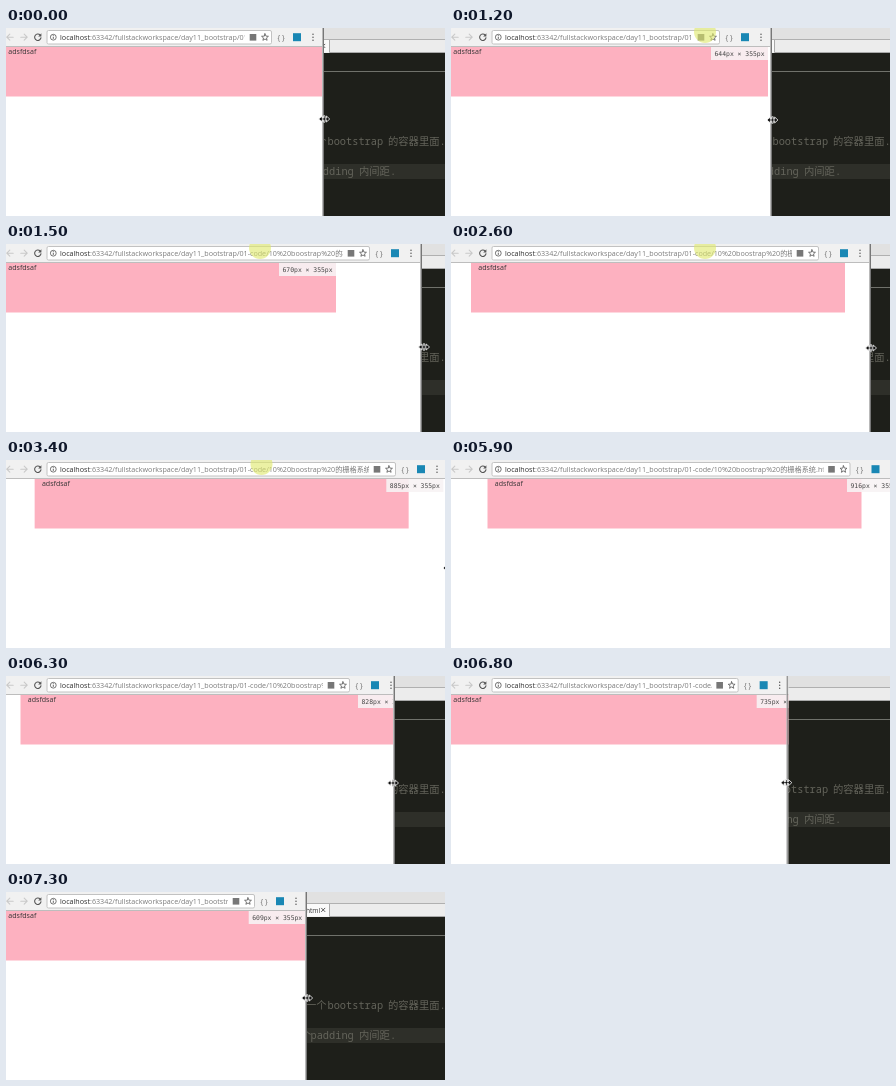
Write an HTML page that moves like this. It is 439x188 px and loops after 8 s.

```html
<!DOCTYPE html>
<html lang="zh">
<head>
<meta charset="utf-8">
<title>Responsive container</title>
<style>
html, body { margin: 0; width: 100%; height: 100%; overflow: hidden; background: #fff; }
svg { overflow: hidden; }
#stage { display: block; width: 439px; height: 188px; }
text { white-space: pre; }
.ui { font-family: "Open Sans", "Noto Sans CJK SC", "Noto Sans CJK", sans-serif; }
.code { font: 10.3px "Noto Sans Mono", "Noto Sans CJK SC", "Noto Sans CJK", monospace; fill: #64645b; }
.size { font: 6.4px "DejaVu Sans Mono", monospace; fill: #454545; }
.line { fill: none; stroke-linecap: round; stroke-linejoin: round; }
</style>
</head>
<body>
<svg id="stage" viewBox="0 0 439 188">
  <g id="editor">
    <rect x="290" width="149" height="188" fill="#1e1f1a"/>
    <rect x="290" width="149" height="25" fill="#ececec"/>
    <rect x="290" width="149" height="11" fill="#e1e1e1"/>
    <path d="M290 11.5H439" stroke="#b0b0b0"/>
    <path d="M290 12H323V24.5H290" fill="#fafafa"/>
    <path d="M323.5 12V24.5H439" fill="none" stroke="#a9a9a9"/>
    <text class="ui" x="300" y="20.5" font-size="6.6" fill="#333">html</text>
    <path class="line" d="M315.5 16.2l3.4 3.4m0-3.4l-3.4 3.4" stroke="#444" stroke-width=".9"/>
    <path d="M290 43.5H439" stroke="#70716b"/>
    <rect x="290" y="136" width="149" height="15" fill="#2e2f29"/>
    <g class="code">
      <text x="300" y="117">一个</text>
      <text x="321.5" y="117">bootstrap</text>
      <text x="382" y="117">的容器里面.</text>
      <text x="295" y="147">个</text>
      <text x="304.5" y="147">padding</text>
      <text x="353" y="147">内间距.</text>
    </g>
  </g>

  <svg id="win" height="188">
    <rect width="480" height="188" fill="#fff"/>
    <rect id="pink" y="18.5" height="50" fill="#fdb1c0"/>
    <text id="word" class="ui" y="26.2" font-size="7.05" fill="#333">adsfdsaf</text>
    <g id="label">
      <rect y="18.5" width="57" height="13.5" fill="#f8f3f4" fill-opacity=".9"/>
      <text id="size" class="size" x="3.5" y="27.8"></text>
    </g>

    <rect width="480" height="18" fill="#f1f1f1"/>
    <path d="M0 18.5H480" stroke="#bdbdbd"/>
    <g class="line" stroke="#c9c9c9" stroke-width="1.1">
      <path d="M7.2 9.2H.8M3.8 6.2l-3 3l3 3"/>
      <path d="M14.8 9.2h6.4M18.2 6.2l3 3l-3 3"/>
      <path d="M34.2 7.1a3.2 3.2 0 1 0 .8 2.6" stroke="#555"/>
    </g>
    <path d="M35.4 5.3v3.2h-3.2z" fill="#555"/>
    <rect id="bar" x="41" y="2.5" height="13.5" rx="1.5" fill="#fff" stroke="#c2c2c2"/>
    <circle cx="47.3" cy="9.2" r="2.9" fill="none" stroke="#555" stroke-width=".8"/>
    <path d="M47.3 8.7v2.2M47.3 7.1v.8" stroke="#555" stroke-width=".9"/>
    <svg id="url" height="18">
      <text class="ui" x="54" y="11.8" font-size="7.17" fill="#7b7b7b"><tspan fill="#2d2d2d">localhost</tspan>:63342/fullstackworkspace/day11_bootstrap/01-code/10%20boostrap%20的栅格系统.html</text>
    </svg>
    <g id="tools">
      <rect x="-74.3" y="6" width="6.6" height="6.6" fill="#777"/>
      <path id="star" class="line" stroke="#555" stroke-width=".8"/>
      <text class="ui" x="-43" y="11.6" font-size="7" fill="#666" text-anchor="middle">{ }</text>
      <rect x="-31" y="5.2" width="8" height="8" fill="#1987b4"/>
      <path d="M-11 6.2v.01M-11 9.2v.01M-11 12.2v.01" class="line" stroke="#555" stroke-width="1.5"/>
    </g>
    <circle id="spot" r="11" fill="#dfe96c" fill-opacity=".62"/>
    <g id="edge">
      <path d="M-1.5 0V188" stroke="#b9b9b9"/>
      <path d="M-.5 0V188" stroke="#777"/>
    </g>
  </svg>

  <path id="cursor" d="M-5.5 0l3.3-3v2.2h1.4v-2.4h1.6v2.4h1.4v-2.2l3.3 3l-3.3 3v-2.2h-1.4v2.4h-1.6v-2.4h-1.4v2.2z"
        fill="#111" stroke="#fff" stroke-width=".8"/>
</svg>
<script>
const LOOP = 8000, STEP = 100, SCALE = 0.4987;
const $ = id => document.getElementById(id);
const set = (id, attrs) => {
  for (const k in attrs) $(id).setAttribute(k, attrs[k]);
};
const move = (id, x, y = 0) => set(id, { transform: `translate(${x} ${y})` });
const show = (id, on) => set(id, { visibility: on ? "visible" : "hidden" });

// time, window edge, toolbar edge, page edge, pointer y
const drag = [
  [0, 318, 318, 316, 91],
  [1100, 318, 318, 316, 91],
  [1200, 321, 321, 317, 92],
  [1300, 333, 333, 319, 95],
  [1400, 374, 374, 324, 100],
  [1500, 416, 416, 330, 103],
  [1600, 419, 419, 400, 104],
  [1700, 419, 419, 419, 104],
  [2500, 419, 419, 419, 104],
  [2600, 420, 420, 420, 104],
  [3400, 442, 442, 437.3, 108],
  [4000, 454, 454, 454, 108],
  [5800, 454, 454, 454, 108],
  [6000, 444, 449, 452, 108],
  [6300, 389, 396, 409, 107],
  [6700, 347, 350, 381, 107],
  [7000, 318, 319, 326, 106],
  [7300, 301, 301, 299.7, 106],
  [8000, 301, 301, 299.7, 106]
];
const labelTimes = [[1200, 1800], [2700, 4500], [5900, LOOP]];
const within = (t, [a, b]) => t >= a && t < b;

function sample(t) {
  const i = drag.findIndex(row => row[0] > t);
  const a = drag[i - 1], b = drag[i];
  const k = (t - a[0]) / (b[0] - a[0]);
  return a.slice(1).map((v, n) => v + (b[n + 1] - v) * k);
}

function spotX(t) {
  if (t < 200) return 284;
  if (t < 300) return 233;
  return t < 2700 ? 254 : 255.5;
}

function draw(time) {
  const t = Math.floor((time % LOOP) / STEP) * STEP;
  const [edge, bar, page, y] = sample(t);

  set("win", { width: edge });
  move("edge", edge);
  set("bar", { width: bar - 93.5 });
  set("url", { width: bar - 79 });
  move("tools", bar);

  // the container is 750px wide from 768px up, fluid below
  const px = Math.round((page + 4) / SCALE);
  const fixed = px >= 768;
  const left = fixed ? (page - 6) / 2 - 187 : -5;
  set("pink", { x: left, width: fixed ? 374 : page - left });
  set("word", { x: left + 7.3 });

  show("label", labelTimes.some(span => within(t, span)));
  move("label", page - 57);
  $("size").textContent = `${px}px × 355px`;

  show("spot", within(t, [100, 3600]));
  move("spot", spotX(t), 4);

  const lead = Math.max(-2, Math.min(2, (edge - page) / 9));
  move("cursor", edge + lead, y);
}

const points = Array.from({ length: 10 }, (_, i) => {
  const r = i % 2 ? 1.6 : 3.6, a = i * Math.PI / 5;
  return `${-59 + r * Math.sin(a)} ${9.4 - r * Math.cos(a)}`;
});
set("star", { d: `M${points.join("L")}Z` });

const start = performance.now();
function tick() {
  draw(performance.now() - start);
  requestAnimationFrame(tick);
}
tick();
</script>
</body>
</html>
```
